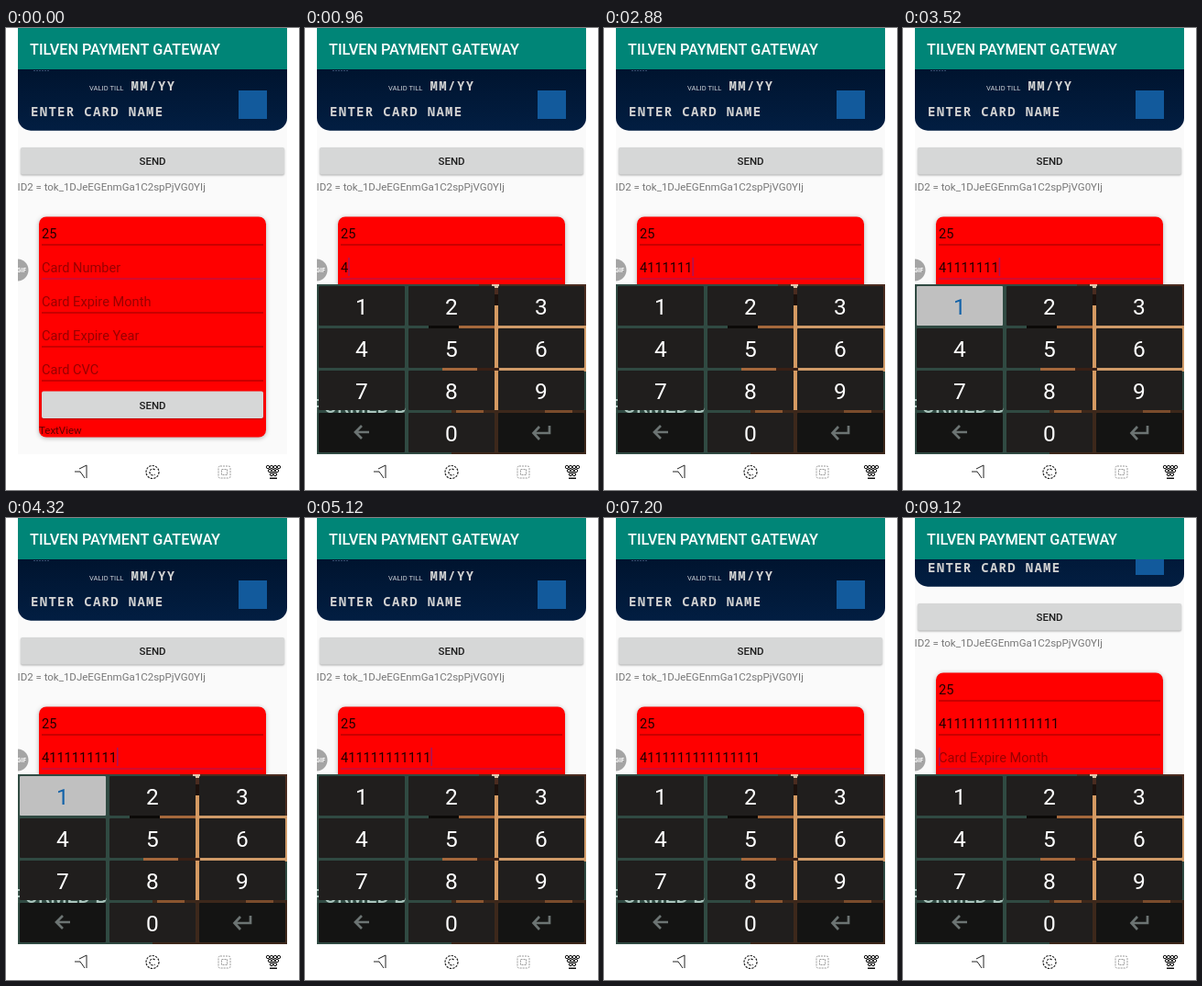
These frames come from a looping animation (320 by 503 pixels, 9600 ms). An HTML page with a canvas:

```html
<!DOCTYPE html>
<html lang="en">
<head>
<meta charset="utf-8">
<title>Payment form</title>
<style>
  html, body { margin: 0; width: 100%; height: 100%; overflow: hidden; background: #fff; }
  canvas { display: block; width: 320px; height: 503px; }
</style>
</head>
<body>
<canvas id="stage"></canvas>
<script>
const W = 320, H = 503, LOOP = 9600, BLINK = 480, PRESS = 160;
const KEYBOARD_AT = 160, NEXT_FIELD_AT = 8000, SCROLL = 37;
const DIGIT_TIMES = [960, 1280, 1440, 1600, 2400, 2560, 2880, 3200,
                     3680, 4160, 4480, 4960, 5440, 5920, 6240, 6720];
const CARD_NUMBER = '4' + '1'.repeat(15);
const ACCENT = '#a8145c';
const FIELD_FONT = '14.6px Roboto, sans-serif';

const canvas = document.getElementById('stage');
const ctx = canvas.getContext('2d');
const ratio = window.devicePixelRatio || 1;
canvas.width = W * ratio;
canvas.height = H * ratio;

function rect(x, y, w, h, color) {
  ctx.fillStyle = color;
  ctx.fillRect(x, y, w, h);
}

function roundRect(x, y, w, h, radius, color, shadow = 0) {
  ctx.save();
  if (shadow) {
    ctx.shadowColor = 'rgba(0,0,0,.3)';
    ctx.shadowBlur = shadow * ratio;
    ctx.shadowOffsetY = ratio;
  }
  ctx.fillStyle = color;
  ctx.beginPath();
  ctx.roundRect(x, y, w, h, radius);
  ctx.fill();
  ctx.restore();
}

function label(text, x, y, font, color, align = 'left', spacing = 0) {
  ctx.font = font;
  ctx.fillStyle = color;
  ctx.textAlign = align;
  ctx.letterSpacing = spacing + 'px';
  ctx.fillText(text, x, y);
}

function line(path, color, width, dash = []) {
  ctx.setLineDash(dash);
  ctx.strokeStyle = color;
  ctx.lineWidth = width;
  ctx.stroke(new Path2D(path));
}

function button(x, y, w) {
  roundRect(x, y, w, 29.5, 2, '#d6d7d7', 2);
  label('SEND', 160, y + 19.2, '500 11.5px Roboto, sans-serif', '#1c1c1c', 'center');
}

function bankCard() {
  const navy = ctx.createLinearGradient(0, 45, 0, 112);
  navy.addColorStop(0, '#00142f');
  navy.addColorStop(1, '#021e42');
  roundRect(13, -40, 294, 151.7, 14, navy);
  for (let x = 30; x < 47; x += 3) rect(x, 46, 2, 1, '#345070');
  const mono = '700 14px "Noto Sans Mono", monospace';
  label('VALID TILL', 91, 67.6, '7.6px Roboto, sans-serif', '#d0d4da');
  label('MM/YY', 136.5, 67.5, mono, '#d2d2d2', 'left', 1.4);
  label('ENTER CARD NAME', 27, 96, mono, '#d2d2d2', 'left', 1.3);
  rect(254, 68, 31, 31, '#125a9c');
}

function form(typed, focus, cursorOn) {
  roundRect(36, 205.5, 248, 240, 8, '#f00', 5);
  const values = ['25', typed, '', '', ''];
  const hints = ['', 'Card Number', 'Card Expire Month', 'Card Expire Year', 'Card CVC'];
  values.forEach((value, i) => {
    const y = 224 + 37 * i;
    label(value || hints[i], 39, y + 5.2, FIELD_FONT, value ? '#200000' : '#990000');
    rect(39, y + 11.5, 242, 1, i === focus ? ACCENT : '#960000');
    if (i === focus && cursorOn) {
      rect(39 + (value ? ctx.measureText(value).width : 0), y - 11, 1.5, 20, ACCENT);
    }
  });
  button(39, 395.5, 242);
  label('TextView', 36, 442, '11.5px Roboto, sans-serif', '#600000');
}

// Soft blocks of a wallpaper, visible only between the keys.
function keyboardBackdrop() {
  rect(13, 279, 294, 185, '#304a42');
  rect(190, 279, 117, 48, '#4a2c20');
  rect(204, 279, 8, 4, '#dbc6ac');
  rect(207, 290, 4, 12, '#1c100c');
  rect(207, 302, 4, 114, '#d59a62');
  rect(211, 324, 96, 50, '#cf9a68');
  rect(150, 324, 57, 50, '#a5683c');
  rect(135, 324, 33, 3, '#0c0a08');
  rect(188, 370, 24, 3, '#3a2015');
  rect(160, 416, 147, 48, '#3d281b');
  rect(165, 416, 30, 3, '#8a552f');
  rect(262, 416, 30, 3, '#7a4c2c');
  label('FORMED B', 9, 418.5, '500 21px Roboto, sans-serif', '#a9c4bc');
}

function keyboard(pressed) {
  keyboardBackdrop();
  ['1', '2', '3', '4', '5', '6', '7', '8', '9', 'back', '0', 'enter'].forEach((key, i) => {
    const x = 15 + 98 * (i % 3), y = 281 + 46 * Math.floor(i / 3);
    const down = key === pressed, special = key.length > 1;
    roundRect(x, y, 94, 43, 1, down ? '#c0c0c0' : special ? '#141413' : '#201e1d');
    if (!special) {
      label(key, x + 47, y + 31, '24.5px Roboto, sans-serif', down ? '#1262a8' : '#fff', 'center');
    }
  });
  line('M70 440H56M62 433L55 440L62 447', '#6c7473', 2.7);
  line('M267 433V441H250M256 434L249.5 441L256 448', '#6c7473', 2.7);
}

function navigationBar() {
  rect(0, 464, W, 39, '#fff');
  line('M88 476L80 480M75 483H81L86 490M88 476V490', '#222', 1);
  line('M167 483.5A7 7 0 1 1 153 483.5A7 7 0 1 1 167 483.5' +
       'M162.6 481A3.4 3.4 0 1 0 162.6 486', '#222', 1.2, [2.4, 1.2]);
  line('M234 477H243Q245 477 245 479V488Q245 490 243 490H234Q232 490 232 488V479Q232 477 234 477Z' +
       'M235.5 480.5H241.5V486.5H235.5Z', '#999', 1, [2, 1]);
  for (let row = 0; row < 3; row++) {
    const dots = 4 - row;
    for (let i = 0; i < dots; i++) {
      const x = 292 + (i - (dots - 1) / 2) * 4, y = 478 + row * 4;
      line(`M${x - 1.7} ${y}a1.7 1.7 0 1 0 3.4 0a1.7 1.7 0 1 0 -3.4 0`, '#111', 1);
    }
  }
  rect(288, 489.5, 8, 1.5, '#111');
}

function badge() {
  ctx.beginPath();
  ctx.arc(12.5, 263.5, 12, 0, 2 * Math.PI);
  ctx.fillStyle = '#a5a5a5';
  ctx.fill();
  label('GIF', 22, 266, '700 6.5px Roboto, sans-serif', '#fff', 'right');
}

function isCursorOn(t, count) {
  if (t >= NEXT_FIELD_AT) return t < 8480 || t >= 8960;
  if (!count) return t >= BLINK;
  return Math.floor((t - DIGIT_TIMES[count - 1]) / BLINK) % 2 === 0;
}

function draw(t) {
  const count = DIGIT_TIMES.filter(time => time <= t).length;
  const scrolled = t >= NEXT_FIELD_AT;
  const pressed = t >= DIGIT_TIMES[count] - PRESS ? CARD_NUMBER[count] : '';

  ctx.setTransform(ratio, 0, 0, ratio, 0, 0);
  rect(0, 0, W, H, '#fff');

  ctx.save();
  ctx.beginPath();
  ctx.rect(13, 0, 294, 464);
  ctx.clip();
  rect(13, 0, 294, 464, '#fafafa');
  ctx.save();
  ctx.translate(0, scrolled ? -SCROLL : 0);
  bankCard();
  button(16, 130, 288);
  label('ID2 = tok_1DJeEGEnmGa1C2spPjVG0YIj', 12.5, 177, '11.5px Roboto, sans-serif', '#777');
  form(CARD_NUMBER.slice(0, count), scrolled ? 2 : 1, isCursorOn(t, count));
  ctx.restore();
  rect(13, 0, 294, 45, '#008577');
  label('TILVEN PAYMENT GATEWAY', 26, 29, '500 16.3px Roboto, sans-serif', '#fff');
  badge();
  if (t >= KEYBOARD_AT) keyboard(pressed);
  ctx.restore();

  navigationBar();
}

function frame() {
  draw(performance.now() % LOOP);
  requestAnimationFrame(frame);
}
frame();
</script>
</body>
</html>
```
